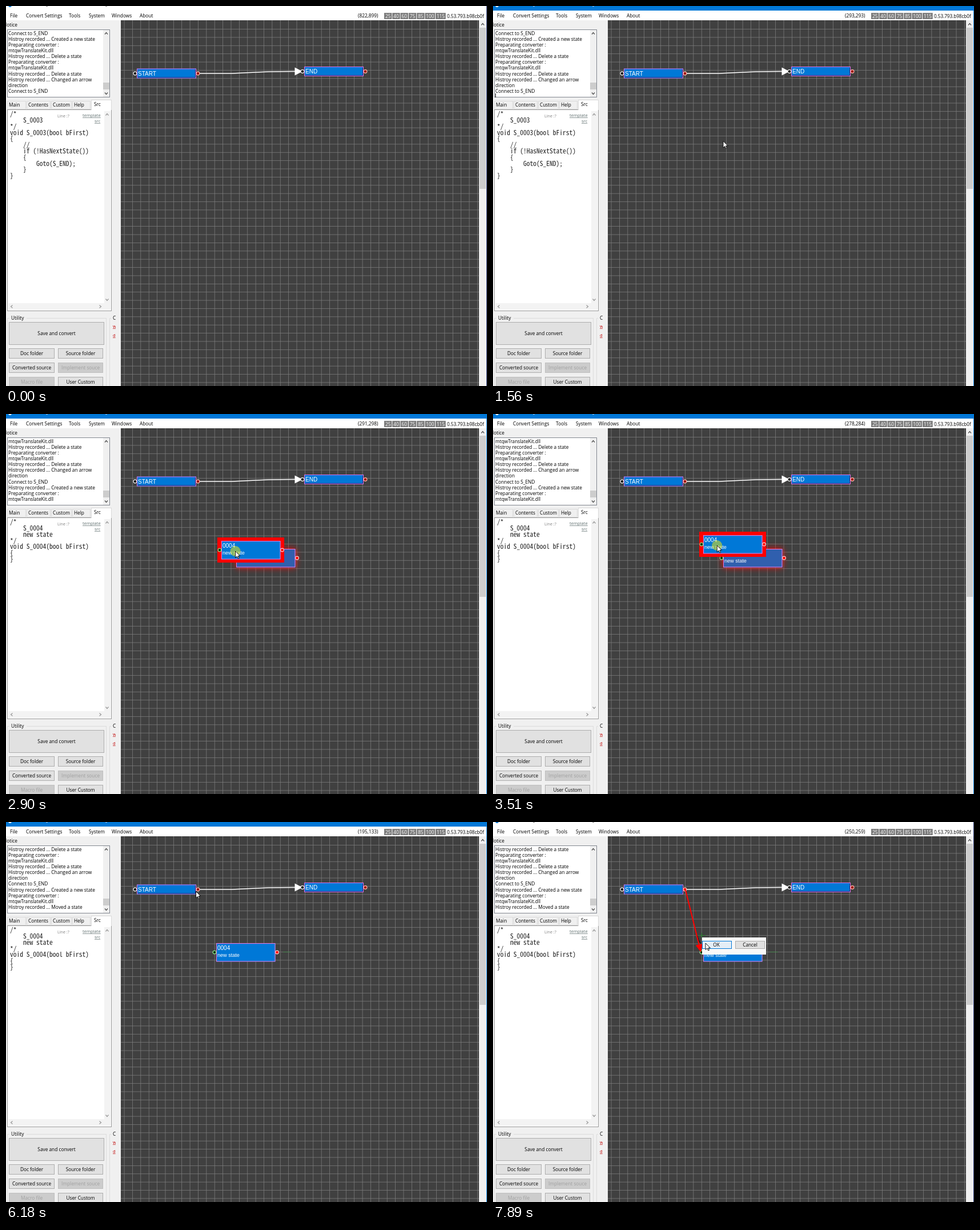
An HTML page with a canvas for the animation above (8 s loop, 842 by 665 pixels).

```html
<!DOCTYPE html>
<html lang="en">
<head>
<meta charset="utf-8">
<title>State chart editor</title>
<style>
  html, body { margin: 0; width: 100%; height: 100%; overflow: hidden; background: #f0f0f0; }
  canvas { display: block; }
</style>
</head>
<body>
<canvas id="stage" width="842" height="665"></canvas>
<script>
const ctx = document.getElementById('stage').getContext('2d', { alpha: false });
const LOOP = 8000, BLUE = '#0078d7';
const UI = '"Open Sans", "Noto Sans", sans-serif';
const LABEL = '"Liberation Sans", Arial, sans-serif';
const MONO = '"Noto Sans Mono CJK JP", "Liberation Mono", monospace';

// Choose the code size from the advance of one character.
ctx.font = `100px ${MONO}`;
const codeSize = 575 / ctx.measureText('0').width;

// Chart units: SCALE pixels each, a grid line every 20.
const SCALE = .719, GRID = 20 * SCALE, ORIGIN = { x: 192.3, y: 25.8 };
const toStage = ([x, y]) => ({ x: ORIGIN.x + x * SCALE, y: ORIGIN.y + y * SCALE });

// Pointer path: time, chart x, chart y.
const path = [
  [0, 822, 899], [69, 822, 899], [70, 780, 829], [850, 263, 265], [1160, 263, 265],
  [1560, 293, 293], [1790, 297, 297], [2100, 323, 318], [2340, 323, 318], [2410, 327, 318],
  [2490, 327, 318], [2900, 291, 298], [3360, 278, 284], [3900, 278, 284], [4300, 214, 169],
  [4780, 200, 142], [5640, 200, 142], [5950, 197, 137], [6180, 195, 133], [6410, 200, 129],
  [6750, 200, 129], [7420, 250, 259], [LOOP, 250, 259]
];
const presses = [[920, 1100], [1640, 1790], [2410, 3580], [6410, 7570]];
const CREATED = 1870, GRABBED = 2410, DROPPED = 3660, LINKING = 6750, LINKED = 7570, DIALOG = 7600;

const history = 'Histroy recorded ... ', prepare = ['Preparating converter :', 'mtqwTranslateKit.dll'];
const log = [
  'Connect to S_END', history + 'Created a new state', ...prepare, history + 'Delete a state',
  ...prepare, history + 'Delete a state', history + 'Changed an arrow', 'direction',
  'Connect to S_END', history + 'Created a new state', ...prepare, history + 'Moved a state'
];
const codeBefore = ['/*', '    S_0003', '*/', 'void S_0003(bool bFirst)', '{', '    //',
  '    if (!HasNextState())', '    {', '        Goto(S_END);', '    }', '}'];
const codeAfter = ['/*', '    S_0004', '    new state', '*/', 'void S_0004(bool bFirst)', '{', '}'];

function pointerAt(t) {
  const i = path.findIndex(p => p[0] > t);
  const [a, b] = [path[i - 1], path[i]];
  const k = (t - a[0]) / (b[0] - a[0]);
  return [1, 2].map(n => Math.round(a[n] + (b[n] - a[n]) * k));
}

function rect(x, y, w, h, fill, stroke) {
  ctx.fillStyle = fill;
  ctx.fillRect(x, y, w, h);
  if (stroke) {
    ctx.strokeStyle = stroke;
    ctx.lineWidth = 1;
    ctx.strokeRect(x + .5, y + .5, w - 1, h - 1);
  }
}

// y is the vertical centre of the capitals.
function text(s, x, y, color = '#000', size = 8.3, font = UI, align = 'left') {
  ctx.font = `${size}px ${font}`;
  ctx.textAlign = align;
  ctx.fillStyle = color;
  ctx.fillText(s, x, y + size * .36);
}

function link(s, x, y, color) {
  text(s, x, y, color, 7.6);
  rect(x, y + 4, ctx.measureText(s).width, .7, color);
}

function line(points, color, width = 1) {
  ctx.beginPath();
  points.forEach(([x, y]) => ctx.lineTo(x, y));
  ctx.strokeStyle = color;
  ctx.lineWidth = width;
  ctx.stroke();
}

function polygon(points, fill, stroke) {
  ctx.beginPath();
  points.forEach(([x, y]) => ctx.lineTo(x, y));
  ctx.closePath();
  ctx.fillStyle = fill;
  ctx.fill();
  if (stroke) {
    ctx.strokeStyle = stroke;
    ctx.lineWidth = .9;
    ctx.stroke();
  }
}

function dot(x, y, r, fill, stroke) {
  ctx.beginPath();
  ctx.arc(x, y, r, 0, Math.PI * 2);
  ctx.fillStyle = fill;
  ctx.fill();
  if (stroke) {
    ctx.strokeStyle = stroke;
    ctx.lineWidth = 1.1;
    ctx.stroke();
  }
}

// Scroll arrow pointing along (dx, dy).
function chevron(x, y, dx, dy, color) {
  const tip = [x + dx * 1.5, y + dy * 1.5], back = [x - dx * 1.5, y - dy * 1.5];
  line([[back[0] + dy * 2.5, back[1] + dx * 2.5], tip, [back[0] - dy * 2.5, back[1] - dx * 2.5]], color, 1.2);
}

function button(label, x, y, w, h, enabled = true) {
  rect(x, y, w, h, enabled ? '#e1e1e1' : '#cccccc', enabled ? '#adadad' : '#bfbfbf');
  text(label, x + w / 2, y + h / 2, enabled ? '#000' : '#a0a0a0', 8.3, UI, 'center');
}

function drawWindow(active, pointer) {
  rect(0, 0, 842, 665, '#f0f0f0');
  rect(0, 0, 842, 8, active ? BLUE : '#fff');
  dot(7, -1, 3, active ? '#fff' : BLUE);
  for (const x of [70, 174]) rect(x, 0, 3, 1, active ? '#9cc9ef' : '#888');
  rect(0, 8, 842, 17, '#fff');
  [['File', 7], ['Convert Settings', 35], ['Tools', 110], ['System', 145], ['Windows', 185], ['About', 234]]
    .forEach(([s, x]) => text(s, x, 17));
  text(`(${pointer})`, 616, 17.5);
  let x = 662;
  for (const zoom of [25, 40, 60, 75, 85, 100, 115]) {
    const w = zoom < 100 ? 13.3 : 17.6;
    rect(x, 12, w, 11, '#7c7c7c');
    text(zoom, x + w / 2, 18, '#fff', 8.2, UI, 'center');
    x += w + 1;
  }
  text('0.53.793.b98cb0f', 772, 18, '#000', 8.1);

  rect(828, 25, 13, 640, '#f0f0f0');
  rect(829, 38, 11, 282, '#cdcdcd');
  chevron(834.5, 32, 0, -1, '#505050');
  rect(841, 0, 1, 665, active ? BLUE : '#1c2b6b');
}

function drawNotice(t) {
  text('Notice', -5, 33);
  rect(2, 41, 180, 119, '#fff', '#828790');
  rect(170, 42, 11, 117, '#f0f0f0');
  rect(170, 134, 11, 12, '#cdcdcd');
  chevron(175.5, 48, 0, -1, '#505050');
  chevron(175.5, 153, 0, 1, '#505050');
  const first = t < CREATED ? 0 : t < GRABBED + 80 ? 1 : t < DROPPED ? 3 : 4;
  log.slice(first, first + 11).forEach((s, i) => text(s, 4, 48 + i * 10.08));
  const blink = t < 1160 ? t >= 1010 : Math.floor((t - 975) / 315) % 2;
  if (blink && t < LINKED) rect(4, 153, 1, 7, '#000');
}

function drawSource(t) {
  rect(2, 181, 183, 353, '#fff', '#9a9a9a');
  [['Main', 2, 33], ['Contents', 36, 42], ['Custom', 79, 36], ['Help', 116, 32]].forEach(([s, x, w]) => {
    rect(x, 166, w, 15, '#f0f0f0', '#d9d9d9');
    text(s, x + 3, 173.5);
  });
  rect(149, 164, 36, 18, '#fff', '#d9d9d9');
  rect(150, 180, 34, 3, '#fff');
  text('Src', 154, 172.5);
  rect(172, 184, 11, 336, '#f3f3f3');
  rect(4, 520, 179, 12, '#f3f3f3');
  chevron(177, 190, 0, -1, '#999');
  chevron(177, 514, 0, 1, '#999');
  chevron(10, 526, -1, 0, '#999');
  chevron(165, 526, 1, 0, '#999');
  (t < GRABBED + 80 ? codeBefore : codeAfter)
    .forEach((s, i) => text(s, 7, 189 + i * 10.8, '#1c1c1c', codeSize, MONO));
  text('Line :?', 90, 192, '#808080', 7.2);
  link('template', 134, 191, '#607070');
  link('src', 155, 201, '#607070');
}

function drawUtility() {
  rect(2, 546, 174, 130, '#f0f0f0', '#dcdcdc');
  rect(6, 541, 30, 10, '#f0f0f0');
  text('Utility', 9, 546);
  button('Save and convert', 5, 553, 167, 40);
  button('Doc folder', 5, 599, 80, 18);
  button('Source folder', 91, 599, 79, 18);
  button('Converted source', 5, 624, 80, 18);
  button('Implement souce', 91, 624, 79, 18, false);
  button('Macro file', 5, 649, 80, 18, false);
  button('User Custom', 91, 649, 79, 18);
  line([[184, 546.5], [181.5, 546.5], [181.5, 665]], '#dcdcdc');
  ctx.save();
  ctx.beginPath();
  ctx.rect(184, 540, 8, 50);
  ctx.clip();
  text('C', 187, 546);
  link('w', 187, 560, '#c00000');
  link('d', 187, 576, '#c00000');
  ctx.restore();
}

function drawGrid() {
  rect(201, 25, 627, 640, '#404040');
  for (let x = ORIGIN.x + GRID; x < 828; x += GRID) rect(x, 25, SCALE, 640, '#808080');
  for (let y = ORIGIN.y + GRID; y < 665; y += GRID) rect(201, y, 627, SCALE, '#808080');
}

function drawTerminal(label, x, y, outFill) {
  rect(x, y, 104, 17, BLUE, '#e070e8');
  line([[x + 1.5, y + 15.5], [x + 102.5, y + 15.5], [x + 102.5, y + 1.5]], '#16307a');
  text(label, x + 2, y + 8.5, '#fff', 10, LABEL);
  dot(x - 3, y + 8.5, 2.9, '#000', '#fff');
  dot(x + 107, y + 8.5, 2.9, outFill, '#ffc0b0');
}

function drawState(x, y, fill = BLUE) {
  rect(x, y, 103.5, 32.4, fill, '#f07ae0');
  text('0004', x + 2, y + 8.5, '#fff', 10, LABEL);
  text('new state', x + 2, y + 21, '#fff', 9.1, LABEL);
  dot(x - 3, y + 16, 2.8, '#0a300a', '#90f090');
  dot(x + 106.5, y + 16, 2.9, '#f00', '#ffd0d0');
}

function drawDragged(x, y) {
  ctx.save();
  ctx.shadowColor = '#f00';
  ctx.shadowBlur = 12;
  rect(403, 236, 103.5, 32.4, '#305fae');
  ctx.restore();
  drawState(403, 236, '#305fae');
  rect(x - 7, y - 6, 117, 44, '#f00');
  drawState(x, y);
}

function drawArrow(x0, y0, x1, y1, color) {
  const a = Math.atan2(y1 - y0, x1 - x0), c = Math.cos(a), s = Math.sin(a);
  const bx = x1 - 14 * c, by = y1 - 14 * s;
  line([[x0, y0], [bx, by]], color, 2);
  polygon([[x1, y1], [bx - 6 * s, by + 6 * c], [bx + 6 * s, by - 6 * c]], color);
}

function drawPointer({ x, y }, pressed) {
  if (pressed) dot(x, y, 9, 'rgba(255, 240, 0, .5)');
  const shape = [[0, 0], [0, 16], [4, 12.5], [6.5, 18], [9, 17], [6.5, 11.5], [11.5, 11.5]];
  polygon(shape.map(([dx, dy]) => [x + dx * SCALE, y + dy * SCALE]), '#fff', '#000');
}

function drawDialog() {
  rect(366, 202, 112, 30, '#f8f8f8');
  rect(366, 208, 52, 14, '#e5eef6', BLUE);
  text('OK', 391, 215, '#000', 8.3, UI, 'center');
  button('Cancel', 424, 208, 52, 14);
}

function drawChart(t, cursor) {
  drawGrid();
  line([[336, 118], [396, 118], [432, 116.2], [460, 115], [506, 114.5]], '#fff', 1.5);
  polygon([[505.5, 107.5], [505.5, 121.5], [519, 114.5]], '#fff');
  drawTerminal('START', 229, 109.5, t < LINKING ? '#900' : '#f00');
  drawTerminal('END', 522, 106, '#900');

  if (t >= DROPPED) {
    rect(485, 227, 14, 1, '#4f8a55');
    rect(379, 250, 1, 12, '#5a5a5a');
    drawState(368, 212);
  } else if (t >= GRABBED + 80) {
    const start = toStage([327, 318]);
    drawDragged(Math.round(403 + cursor.x - start.x), Math.round(236 + cursor.y - start.y));
  } else if (t >= CREATED) {
    drawState(403, 236);
  }

  if (t >= LINKED) {
    rect(365, 194, 1, 9, '#2f8a35');
    rect(359, 198, 13, 1, '#2f8a35');
    line([[357.5, 198], [360, 207], [364, 213]], '#000');
    drawArrow(337, 119, 364, 228, '#f00');
  } else if (t >= LINKING + 60) {
    line([[337, 119], [cursor.x, cursor.y]], '#f00', 2);
  }
}

function frame(now) {
  const t = now % LOOP;
  const pointer = pointerAt(t), cursor = toStage(pointer);
  drawWindow(t >= 920 && t < DIALOG, pointer);
  drawNotice(t);
  drawSource(t);
  drawUtility();
  drawChart(t, cursor);
  if (t >= DIALOG) drawDialog();
  drawPointer(cursor, presses.some(([from, to]) => t >= from && t < to));
  requestAnimationFrame(frame);
}
requestAnimationFrame(frame);
</script>
</body>
</html>
```
